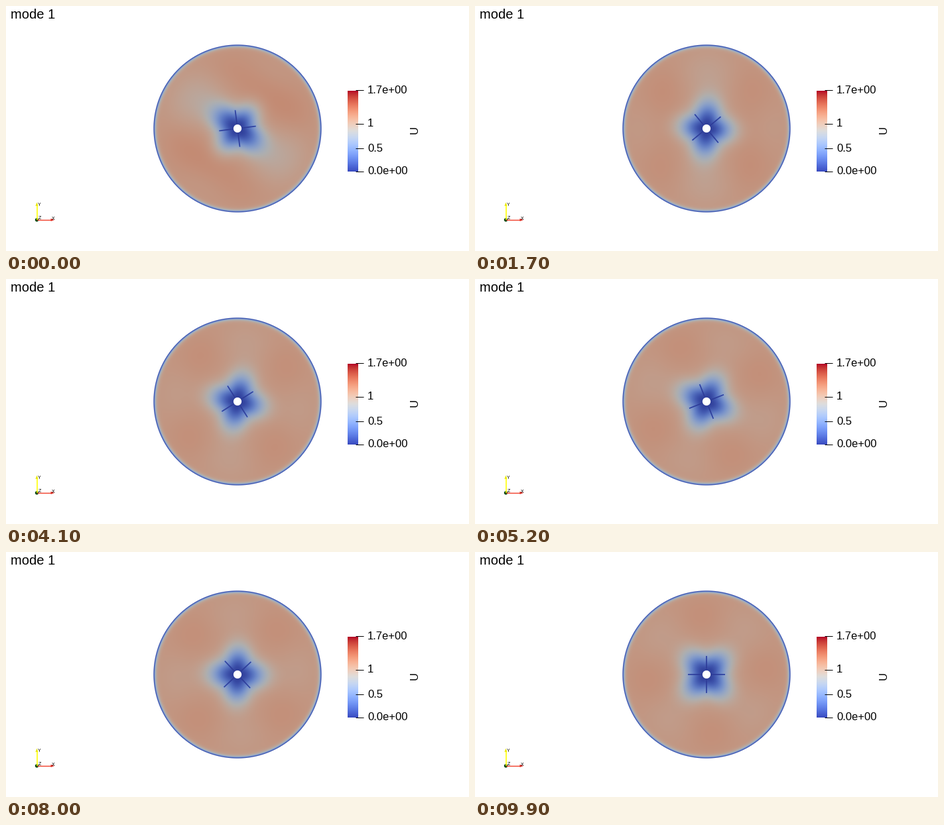
A matplotlib script that plays this animation: 698x370 px, repeating every 10000 ms.

```python
import numpy as np
import matplotlib.pyplot as plt
from matplotlib.animation import FuncAnimation
from matplotlib.patches import Circle, Polygon

W, H, DPI = 698, 370, 100
FRAMES, INTERVAL = 100, 100
STEP = np.radians(7.2)          # rotor turn per frame
CX, CY, RADIUS, HOLE = 349, 185, 126.7, 6.1
HALF = 130
U_MAX, U_MEAN, SHADE = 1.7, 1.1, 0.79

plt.rcParams["font.family"] = "Liberation Sans"
cmap = plt.get_cmap("coolwarm", 1024)

fig = plt.figure(figsize=(W / DPI, H / DPI), dpi=DPI, facecolor="white")
ax = fig.add_axes([0, 0, 1, 1])
ax.axis("off")

# Polar grid on pixel centres, angle counter-clockwise
side = np.arange(-HALF, HALF) + 0.5
gx, gy = np.meshgrid(side, -side)
r = np.hypot(gx, gy)
theta = np.arctan2(gy, gx)

alpha = np.clip(RADIUS - r + 0.5, 0, 1) * np.clip(r - HOLE + 0.5, 0, 1)
wall = 1 - np.exp(-np.clip(126 - r, 0.3, None) / 1.9)
ring4 = 0.04 * np.exp(-((r - 90) / 30) ** 2)
ring2 = 0.09 * np.exp(-((r - 72) / 34) ** 2)


def speed(n):
    """Velocity magnitude in the tank: steady four-fold flow plus a decaying start-up."""
    turn = STEP * (n + 1)
    phi = theta - turn
    two = np.exp(-n / 20) * np.sin(2 * phi)
    core = 34.5 - 4.5 * np.cos(4 * phi) - 4 * two
    u = U_MEAN * (1 - np.exp(-(r / core) ** 2.3))
    u += ring4 * np.cos(4 * phi - np.radians(20)) + ring2 * two
    # Blades: two crossed thin bars
    c, s = np.cos(turn), np.sin(turn)
    across = np.minimum(abs(gx * s - gy * c), abs(gx * c + gy * s))
    blade = np.clip(1.4 - across, 0, 1) * np.clip(28.5 - r, 0, 1)
    return u * wall * (1 - 0.95 * blade)


def disc(n):
    rgba = cmap(np.clip(speed(n) / U_MAX, 0, 1))
    rgba[..., :3] *= SHADE
    rgba[..., 3] = alpha
    return rgba


def label(x, y, text, px, **kw):
    kw = {"ha": "left", "va": "baseline", "color": "black", **kw}
    ax.text(x, y, text, fontsize=px * 72 / DPI, **kw)


def line(xs, ys, color, width):
    ax.plot(xs, ys, color=color, lw=width * 72 / DPI, solid_capstyle="butt")


tank = ax.imshow(disc(0), extent=(CX - HALF, CX + HALF, CY + HALF, CY - HALF),
                 interpolation="nearest")

label(7, 19, "mode 1", 20.2)

# Colour bar
ax.imshow(np.linspace(1, 0, 244)[:, None], cmap=cmap, vmin=0, vmax=1,
          extent=(515, 531, 250, 128), interpolation="nearest")
for y, text in ((126.5, "1.7e+00"), (177.5, "1"), (214.5, "0.5"), (249.5, "0.0e+00")):
    line([527, 539], [y, y], "black", 1)
    label(545, y + 5, text, 16.6)
label(616.5, 187, "U", 16.5, rotation=90, ha="center", va="center")

# Orientation axes
line([46.5, 46.5], [323, 301], "#ffff00", 1.6)
line([47, 68], [323, 323], "#f03c28", 1.4)
ax.add_patch(Polygon([(44.5, 302), (48.5, 302), (46.5, 296.5)], color="#e6e600", lw=0))
ax.add_patch(Polygon([(67.5, 321), (67.5, 325), (73, 323)], color="#d81e14", lw=0))
ax.add_patch(Circle((46.5, 323), 2.7, color="#0a4a14", lw=0))
label(68.5, 323, "X", 7)
label(47.5, 302, "Y", 7)
label(48.5, 322.5, "Z", 7)

ax.set_aspect("auto")
ax.set_xlim(0, W)
ax.set_ylim(H, 0)


def update(n):
    tank.set_data(disc(n))
    return (tank,)


anim = FuncAnimation(fig, update, frames=FRAMES, interval=INTERVAL,
                     repeat=True, repeat_delay=0, blit=False)
plt.show()
```
